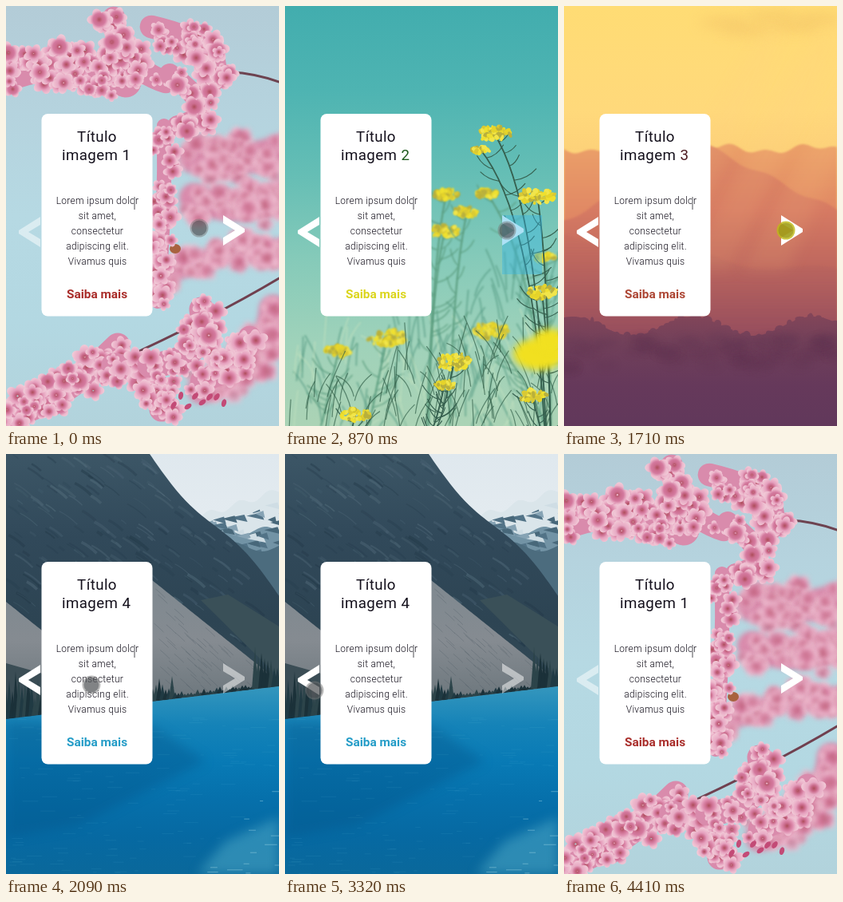
An HTML page with a canvas that plays this animation: 342x526 px, repeating every 5.01 s.

```html
<!DOCTYPE html>
<html lang="pt">
<head>
<meta charset="utf-8">
<title>Carrossel</title>
<style>
html, body { margin: 0; width: 100%; height: 100%; overflow: hidden; }
canvas { display: block; width: 342px; height: 526px; }
</style>
</head>
<body>
<canvas id="stage" width="342" height="526"></canvas>
<script>
const W = 342, H = 526, LOOP = 5010;
const ctx = document.getElementById('stage').getContext('2d');

function seeded(a) {
  return () => {
    a = (a + 0x6D2B79F5) | 0;
    let t = Math.imul(a ^ (a >>> 15), 1 | a);
    t = (t + Math.imul(t ^ (t >>> 7), 61 | t)) ^ t;
    return ((t ^ (t >>> 14)) >>> 0) / 4294967296;
  };
}

function scene(paint, seed) {
  const c = document.createElement('canvas');
  c.width = W; c.height = H;
  paint(c.getContext('2d'), seeded(seed));
  return c;
}

const pick = (rnd, list) => list[Math.floor(rnd() * list.length)];

function shade(f, colors) {
  colors.forEach((c, i) => f.addColorStop(i / (colors.length - 1), c));
  return f;
}

const vertical = (g, y0, y1, ...colors) => shade(g.createLinearGradient(0, y0, 0, y1), colors);

function sky(g, ...colors) {
  g.fillStyle = vertical(g, 0, H, ...colors);
  g.fillRect(0, 0, W, H);
}

function poly(g, pts, fill) {
  g.beginPath();
  for (let i = 0; i < pts.length; i += 2) g.lineTo(pts[i], pts[i + 1]);
  g.closePath();
  g.fillStyle = fill;
  g.fill();
}

// Everything below the line y = f(x)
function ground(g, f, fill) {
  const pts = [0, H];
  for (let x = 0; x <= W; x += 3) pts.push(x, f(x));
  poly(g, [...pts, W, H], fill);
}

function oval(g, x, y, rx, ry, fill, turn = 0) {
  g.beginPath();
  g.ellipse(x, y, rx, ry, turn, 0, Math.PI * 2);
  g.fillStyle = fill;
  g.fill();
}

function curve(g, [x0, y0, cx, cy, x1, y1], color, width) {
  g.beginPath();
  g.moveTo(x0, y0);
  g.quadraticCurveTo(cx, cy, x1, y1);
  g.strokeStyle = color;
  g.lineWidth = width;
  g.stroke();
}

function along([x0, y0, cx, cy, x1, y1], t) {
  const s = 1 - t;
  return [s * s * x0 + 2 * s * t * cx + t * t * x1, s * s * y0 + 2 * s * t * cy + t * t * y1];
}

function soft(g, blur, paint) {
  g.filter = `blur(${blur}px)`;
  paint();
  g.filter = 'none';
}

function flower(g, rnd, x, y, r) {
  const mid = pick(rnd, ['#de8cae', '#e59fbd', '#e7aac4', '#d47a9f']);
  const fill = shade(g.createRadialGradient(x, y, 0, x, y, r),
    ['#ad4d5a', '#cb6c8d', mid, '#edb9cd', '#f1cbd8']);
  const spin = rnd() * 6.3, squash = .7 + rnd() * .3;
  for (let i = 0; i < 5; i++) {
    const a = spin + i * Math.PI * .4;
    oval(g, x + Math.cos(a) * r * .55, y + Math.sin(a) * r * .55 * squash, r * .48, r * .38, fill, a);
  }
}

// Flowers scattered along a curved branch
function bough(g, rnd, line, spread) {
  curve(g, line, '#d98bac', spread * 1.3);
  const length = Math.hypot(line[4] - line[0], line[5] - line[1]);
  for (let i = 0; i < length * spread / 65; i++) {
    const [x, y] = along(line, rnd()), a = rnd() * 6.3, d = Math.sqrt(rnd()) * spread;
    flower(g, rnd, x + Math.cos(a) * d, y + Math.sin(a) * d, 8 + rnd() * 8);
  }
}

function blossoms(g, rnd) {
  sky(g, '#b3ccd7', '#b5d3de', '#b6d9e3', '#b3d8e2', '#b2d3dc');
  g.lineCap = 'round';
  soft(g, 3, () => {
    bough(g, rnd, [235, 190, 290, 200, 345, 180], 30);
    bough(g, rnd, [235, 240, 290, 265, 345, 235], 28);
    bough(g, rnd, [185, 345, 270, 300, 345, 305], 20);
    bough(g, rnd, [245, 480, 330, 450, 335, 380], 28);
  });
  curve(g, [282, 83, 310, 84, 342, 95], '#6d4350', 3);
  curve(g, [342, 341, 260, 390, 135, 447], '#70404f', 3);
  oval(g, 212, 304, 7, 6, '#a8623f');
  bough(g, rnd, [8, 85, 80, 60, 150, 95], 30);
  bough(g, rnd, [135, 15, 140, 75, 200, 95], 22);
  bough(g, rnd, [182, 26, 285, 50, 255, 95], 22);
  bough(g, rnd, [205, 85, 275, 135, 215, 150], 20);
  bough(g, rnd, [198, 150, 200, 260, 190, 370], 14);
  bough(g, rnd, [0, 515, 65, 500, 140, 425], 24);
  bough(g, rnd, [135, 450, 200, 460, 195, 505], 24);
  bough(g, rnd, [180, 450, 255, 445, 245, 380], 24);
  bough(g, rnd, [245, 470, 290, 455, 305, 415], 22);
  for (let x = 210; x < 280; x += 9) oval(g, x, 484 + rnd() * 20, 3, 5, '#c34a76', rnd());
}

function tuft(g, rnd, x, y, size) {
  for (let i = 0; i < size * 3; i++) {
    const a = rnd() * 6.3, d = Math.sqrt(rnd()) * size;
    oval(g, x + Math.cos(a) * d, y + Math.sin(a) * d * .42, 2 + rnd() * 2.5, 1.5 + rnd() * 2,
      pick(rnd, ['#efe02f', '#e6d42a', '#d9c934', '#f1e54b', '#b9b03c']), rnd() * 3);
  }
}

// A stem rising to a flower head, with small side twigs
function plant(g, rnd, [x, y, size], color, width) {
  const root = x > 230 ? x + (334 - x) * .9 : x - 22;
  const stem = [x, y, x + (root - x) * .8, y + 80, root, H];
  curve(g, stem, color, width);
  for (let t = .06; t < .7; t += .07) {
    const [sx, sy] = along(stem, t), d = (rnd() < .5 ? -1 : 1) * (8 + rnd() * 20);
    curve(g, [sx, sy, sx + d * .6, sy - 2, sx + d, sy - 8 - rnd() * 14], color, width * .6);
  }
  tuft(g, rnd, x, y, size);
}

function grass(g, rnd, n, top, color, width) {
  for (let i = 0; i < n; i++) {
    const x = W * Math.pow(rnd(), .7), y = top(x) + rnd() * (H - top(x)) + 25, d = (rnd() - .5) * 50;
    curve(g, [x, y, x + d * .2, y - 20, x + d, y - 25 - rnd() * 35], color, width);
  }
}

function meadow(g, rnd) {
  sky(g, '#42adae', '#4eb4b2', '#65beb5', '#85cab9', '#9fd2ba', '#abd3b5');
  const far = [[202, 236, 15], [253, 235, 13], [200, 282, 18], [228, 258, 15],
    [67, 432, 16], [128, 416, 23], [258, 407, 22], [325, 314, 12]];
  const near = [[262, 160, 20], [245, 180, 10], [316, 238, 22], [322, 358, 18],
    [212, 446, 22], [200, 474, 12], [310, 488, 18], [88, 512, 18]];
  soft(g, 1, () => {
    grass(g, rnd, 90, x => 430 - x * .4, 'rgba(84,154,130,.6)', 2);
    grass(g, rnd, 60, () => 400, 'rgba(190,224,190,.6)', 2);
    far.forEach(p => plant(g, rnd, p, '#5a9c7e', 2));
  });
  grass(g, rnd, 100, x => 460 - x * .2, 'rgba(52,98,76,.7)', 1.2);
  near.forEach(p => plant(g, rnd, p, '#355f4e', 1.8));
  soft(g, 4, () => {
    oval(g, 318, 436, 32, 20, '#f1e020');
    oval(g, 332, 418, 20, 14, '#f1e020');
  });
}

function sunset(g, rnd) {
  sky(g, '#ffdc74', '#ffd97b', '#f9c575', '#eda36c', '#dc8066');
  soft(g, 8, () => {
    for (let x = 200; x < W; x += 30) oval(g, x, 12 + rnd() * 18, 30, 8, 'rgba(243,196,104,.5)');
  });
  soft(g, 1, () => {
    ground(g, x => 179 + 4 * Math.sin(x / 18) + 3 * Math.sin(x / 7), vertical(g, 170, 400, '#eca169', '#dd8163', '#c26860'));
    ground(g, x => 177 + .5 * Math.abs(x - 183) + 3 * Math.sin(x / 11),
      vertical(g, 175, 410, '#df8a65', '#d77b63', '#bd665e', '#9a505d'));
    ground(g, x => 285 + x * .15 + 8 * Math.sin(x / 30),
      vertical(g, 270, 410, 'rgba(203,112,95,.3)', 'rgba(150,78,94,.7)'));
  });
  soft(g, 9, () => {
    for (let x = 250; x < 400; x += 70) {
      poly(g, [x, 30, x + 25, 30, x - 110, 330, x - 170, 330], 'rgba(255,205,130,.12)');
    }
  });

  const canopy = x => 401 + 12 * Math.sin(x / 24 - 2);
  const trees = vertical(g, 370, H, '#8b4858', '#71405a', '#66395b', '#61385b');
  ground(g, canopy, trees);
  for (let i = 0; i < 170; i++) {
    const x = rnd() * W;
    oval(g, x, canopy(x) + rnd() * 10, 2 + rnd() * 5, 2 + rnd() * 4, trees);
  }
  soft(g, 3, () => {
    for (let i = 0; i < 60; i++) oval(g, rnd() * W, 415 + rnd() * 40, 14, 7, 'rgba(96,52,82,.2)');
  });
}

function lake(g, rnd) {
  sky(g, '#dfe8ee', '#eef2f4', '#e6edf0');
  const shore = x => 332 - x * .12;
  const ridge = x => (x - 180) * 1.1 + 9 * Math.sin((x - 180) / 26);
  const peaks = x => 76 - (x - 250) * .33 + 4 * Math.sin(x / 6);
  ground(g, x => x < 235 ? H : peaks(x), '#dae5ea');
  ground(g, x => x < 235 ? H : 96 + 5 * Math.sin(x / 9), '#7293a5');
  for (let i = 0; i < 40; i++) {
    const x = 245 + rnd() * 97, y = peaks(x) + 8 + rnd() * 60, d = 8 + rnd() * 14;
    poly(g, [x, y, x + d, y - 4, x + d * 1.2, y + 5], pick(rnd, ['#527387', '#86a3b4', '#cfdde4', '#48687a']));
  }
  ground(g, x => x < 235 ? H : 116 + 6 * Math.sin(x / 12), '#4c6c7e');
  ground(g, ridge, vertical(g, 0, 310, '#3c5666', '#31495a', '#2d4453', '#344b56'));

  // Rock strata
  for (let i = 0; i < 260; i++) {
    const x = rnd() * 300, y = rnd() * 250, d = 8 + rnd() * 24;
    if (y < ridge(x) + 3) continue;
    g.globalAlpha = .2 + rnd() * .25;
    curve(g, [x, y, x + d * .4, y + d * .2, x + d * .75, y + d * .55],
      pick(rnd, ['#213645', '#587180', '#283f50', '#4c6575']), 1 + rnd() * 3);
  }
  g.globalAlpha = 1;
  const scree = x => x < 60 ? 185 + x * .8 : x < 180 ? H : 158 + (x - 183) * .8;
  ground(g, scree, vertical(g, 160, 308, '#7f8990', '#858b91', '#6d777d'));
  poly(g, [0, 262, 46, 275, 46, 340, 0, 340], '#3b4d55');
  poly(g, [244, 183, 278, 176, 342, 216, 342, 280], '#3a5058');
  for (let i = 0; i < 120; i++) {
    const x = 185 + rnd() * 157, y = 160 + rnd() * 140;
    if (y > scree(x)) curve(g, [x, y, x + 5, y + 4, x + 12, y + 11], 'rgba(75,87,96,.3)', 1);
  }
  for (let x = 0; x < W; x += 4) {
    const bank = shore(x), tall = x < 46 || x > 310 ? 40 : x < 212 ? 20 : 6;
    poly(g, [x, bank - tall * (.5 + rnd()), x + 4, bank, x - 4, bank], pick(rnd, ['#203a43', '#2c444a', '#1b3139']));
  }

  ground(g, shore, vertical(g, 292, H, '#3496bd', '#1583b8', '#087ab5', '#0670ab', '#0669a2', '#0a689b'));
  soft(g, 7, () => {
    poly(g, [0, 336, 183, 340, 250, 385, 90, 465, 0, 480], 'rgba(4,81,132,.35)');
    poly(g, [240, 526, 275, 485, 342, 455, 342, 526], 'rgba(91,181,207,.45)');
  });
  for (let i = 0; i < 150; i++) {
    const x = rnd() * W, y = 330 + rnd() * 196;
    g.fillStyle = x + y > 750 ? 'rgba(162,215,229,.45)' : 'rgba(100,185,217,.1)';
    g.fillRect(x, y, 4 + rnd() * 16, 1);
  }
}

const slides = [
  { bg: scene(blossoms, 11), link: '#a92d2a', digit: '#14101c' },
  { bg: scene(meadow, 23), link: '#dbd51c', digit: '#205c20' },
  { bg: scene(sunset, 37), link: '#ad4634', digit: '#4e1c22' },
  { bg: scene(lake, 51), link: '#239cc7', digit: '#14101c' }
];

// Press time and step: right arrow +1, left arrow -1
const clicks = [[770, 1], [1220, 1], [1710, 1], [3330, -1], [3610, -1], [3860, -1]];
const DELAY = 70, GLOW = 290;

// Time, x, y
const stops = [
  [20, 242, 278], [280, 249, 252], [530, 269, 259], [640, 278, 281], [1830, 278, 281],
  [2090, 107, 289], [2700, 63, 297], [3320, 37, 296], [4080, 37, 296], [4400, 258, 522]
];

function pointer(t) {
  if (t >= 4410) return null;
  const i = stops.findIndex(s => s[0] > t);
  if (i === 0) return stops[0].slice(1);
  if (i < 0) return stops[stops.length - 1].slice(1);
  const [t0, x0, y0] = stops[i - 1], [t1, x1, y1] = stops[i];
  const k = (t - t0) / (t1 - t0);
  return [x0 + (x1 - x0) * k, y0 + (y1 - y0) * k];
}

function text(str, x, y, font, color, align = 'center') {
  ctx.font = font + ' Roboto, sans-serif';
  ctx.fillStyle = color;
  ctx.textAlign = align;
  ctx.fillText(str, x, y);
}

function card(n) {
  const { link, digit } = slides[n], ink = '#14101c', title = '400 18.72px';
  ctx.beginPath();
  ctx.roundRect(44.5, 135, 139, 253.5, 8);
  ctx.fillStyle = '#fff';
  ctx.fill();
  ctx.letterSpacing = '0.4px';
  text('Título', 114, 170, title, ink);
  text('imagem ', 70, 193, title, ink, 'left');
  text(n + 1, 70 + ctx.measureText('imagem ').width, 193, title, digit, 'left');
  ctx.letterSpacing = '0.25px';
  ['Lorem ipsum dolor', 'sit amet,', 'consectetur', 'adipiscing elit.', 'Vivamus quis']
    .forEach((s, i) => text(s, 114.5, 248 + i * 19, '300 12px', ink));
  ctx.letterSpacing = '0px';
  text('Saiba mais', 114, 366, '700 15.4px', link);
  ctx.fillStyle = '#a5a5a8';
  ctx.fillRect(160, 239, 2, 16);
}

function arrow(x, y, dir, dim) {
  ctx.save();
  ctx.translate(x, y);
  ctx.scale(dir, 1);
  ctx.globalAlpha = dim ? .5 : 1;
  poly(ctx, [0, -19, 27, -2, 27, 2, 0, 19, 0, 9, 15, 0, 0, -9], '#fff');
  ctx.restore();
}

function draw(t) {
  const n = clicks.reduce((sum, [at, step]) => t >= at + DELAY ? sum + step : sum, 0);
  ctx.drawImage(slides[n].bg, 0, 0);
  card(n);
  arrow(43, 283, -1, n === 0);
  arrow(272, 281, 1, n === 3);

  let pressed = false;
  for (const [at, step] of clicks) {
    const age = t - at;
    if (age < 0 || age >= GLOW) continue;
    if (age < DELAY) {
      pressed = true;
      continue;
    }
    ctx.globalAlpha = Math.min(1, (GLOW - age) / 90);
    ctx.fillStyle = 'rgba(51,181,229,.4)';
    ctx.fillRect(step > 0 ? 272 : 16, 262, step > 0 ? 50 : 53, 74);
    ctx.globalAlpha = 1;
  }

  const p = pointer(t);
  if (!p) return;
  oval(ctx, ...p, 11.5, 11.5, pressed ? 'rgba(190,185,20,.8)' : 'rgba(120,120,120,.5)');
  oval(ctx, ...p, 9.5, 9.5, pressed ? 'rgba(135,135,25,.5)' : 'rgba(60,65,68,.45)');
}

const start = performance.now();
function tick() {
  draw((performance.now() - start) % LOOP);
  requestAnimationFrame(tick);
}
tick();
</script>
</body>
</html>
```
